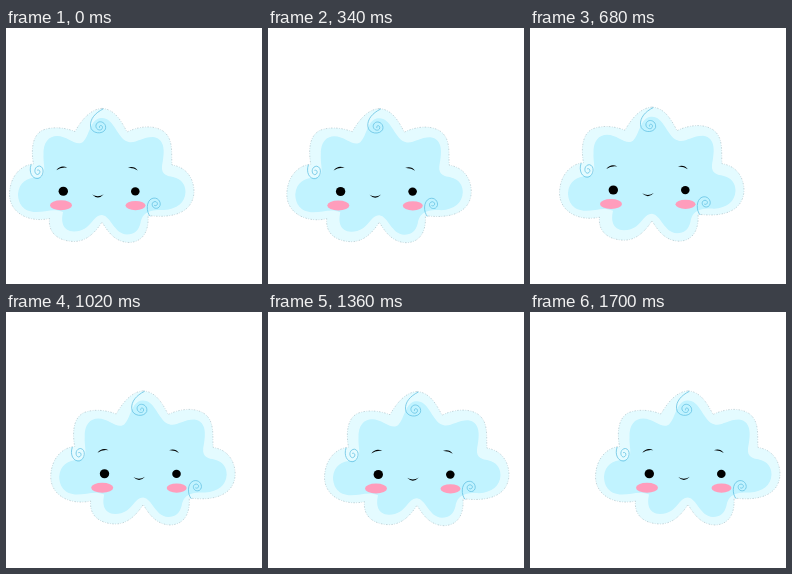
Write an HTML page that moves like this. It is 256 by 256 pixels and loops after 2.04 s.

```html
<!DOCTYPE html>
<html lang="en">
<head>
<meta charset="utf-8">
<title>Drifting cloud</title>
<style>
html, body { margin: 0; width: 100%; height: 100%; overflow: hidden; background: #fff; }
svg { display: block; width: 100vw; height: 100vh; }
.line { fill: none; stroke-linecap: round; stroke-linejoin: round; }
</style>
</head>
<body>
<svg viewBox="0 0 256 256">
  <g id="cloud">
    <path fill="#e4fbff" stroke="#7f9aa4" stroke-width=".4" stroke-dasharray="1.5 1.6 .7 1.4" d="M96 80.4
      C108 81 115 92 121 104 C131 99 146 96 157 103 C168 111 165 125 166 137
      C180 139 188 150 188 164 C187 183 170 191 142 187.5
      C143 200 139 214 123 214.5 C109 214 102 204 96 194
      C89 205 80 213.5 68 213.5 C51 213 42 204 43.5 190.5
      C23 195 3.5 185 3.5 166 C4 148 15 137 27.5 136
      C25 122 26 107 37 102 C48 98 60 100 69 103.5
      C75 93 84 81 96 80.4 Z"/>
    <path fill="#c1f3ff" d="M95 90
      C107 89 110 106 119 112.5 C128 118 134 109 147 109
      C161 111 158 127 156 138 C155 147 162 148 167 149
      C176 151 179.5 157 179.5 164 C179 175 171 181 158 182
      C140 181 136 187 134.5 195 C132.5 203 128 206.5 121 206.5
      C108 206 105 188 96 187 C86 187 86 203 68 203.5
      C56 203 55 193 57 184 C48 180 40 184 30 184
      C17 184 12 175 12 166 C13 154 22 149 32 149.5
      C42 148 37 138 37.5 127 C37 114 43 108 51 108
      C62 108 70 119 77 114 C84 107 84 91 95 90 Z"/>
    <g class="line" stroke="#5fbfe2" stroke-width=".75">
      <path d="M97 81 C89 85 84 91 84.500 98 C85 106 97 107 99.500 101 C101 94 92 91 90 97 C89 102 96 104 96.500 99.500 C96.500 96.500 92.500 97 93.500 99.500"/>
      <path d="M25 137 C22.500 144 26 151 32 150.500 C38 149 39 139 33.500 138 C28 138 27.500 146 31.500 146.500 C35 146 34.500 141 31.500 142"/>
      <path d="M144 188 C140 184 140 173 146 170.500 C153 168 157 177 152 180 C146 182 144 174 149 173.500 C153 174 151.500 179 148.500 177.500"/>
    </g>
    <ellipse cx="55" cy="177.3" rx="11" ry="5" fill="#ff9dbc"/>
    <ellipse cx="129.5" cy="177.6" rx="10" ry="4.6" fill="#ff9dbc"/>
    <ellipse cx="57.3" cy="163.3" rx="4.7" ry="4.5"/>
    <ellipse cx="129.3" cy="163.4" rx="4.3" ry="4.1"/>
    <path d="M50.3 142.3 Q55 136.500 61.300 139.800 Q55 138.800 50.300 142.300 Z"/>
    <path d="M121.8 139.8 Q128 137.500 131.800 142.500 Q128 139.500 121.800 139.800 Z"/>
    <path d="M86.2 166.6 Q92 170.200 97.800 166.300 Q92 172.600 86.200 166.600 Z"/>
  </g>
</svg>
<script>
const HOLD = 340;
const drift = [[0, 0], [15.3, .2], [26, -1.3], [41.2, -1.5], [53, -.8], [62, -1.5]];
const cloud = document.getElementById("cloud");

function draw(time) {
  const [x, y] = drift[Math.floor(time / HOLD) % drift.length];
  cloud.setAttribute("transform", `translate(${x} ${y})`);
}

function tick(now) {
  draw(now);
  requestAnimationFrame(tick);
}

draw(0);
requestAnimationFrame(tick);
</script>
</body>
</html>
```
